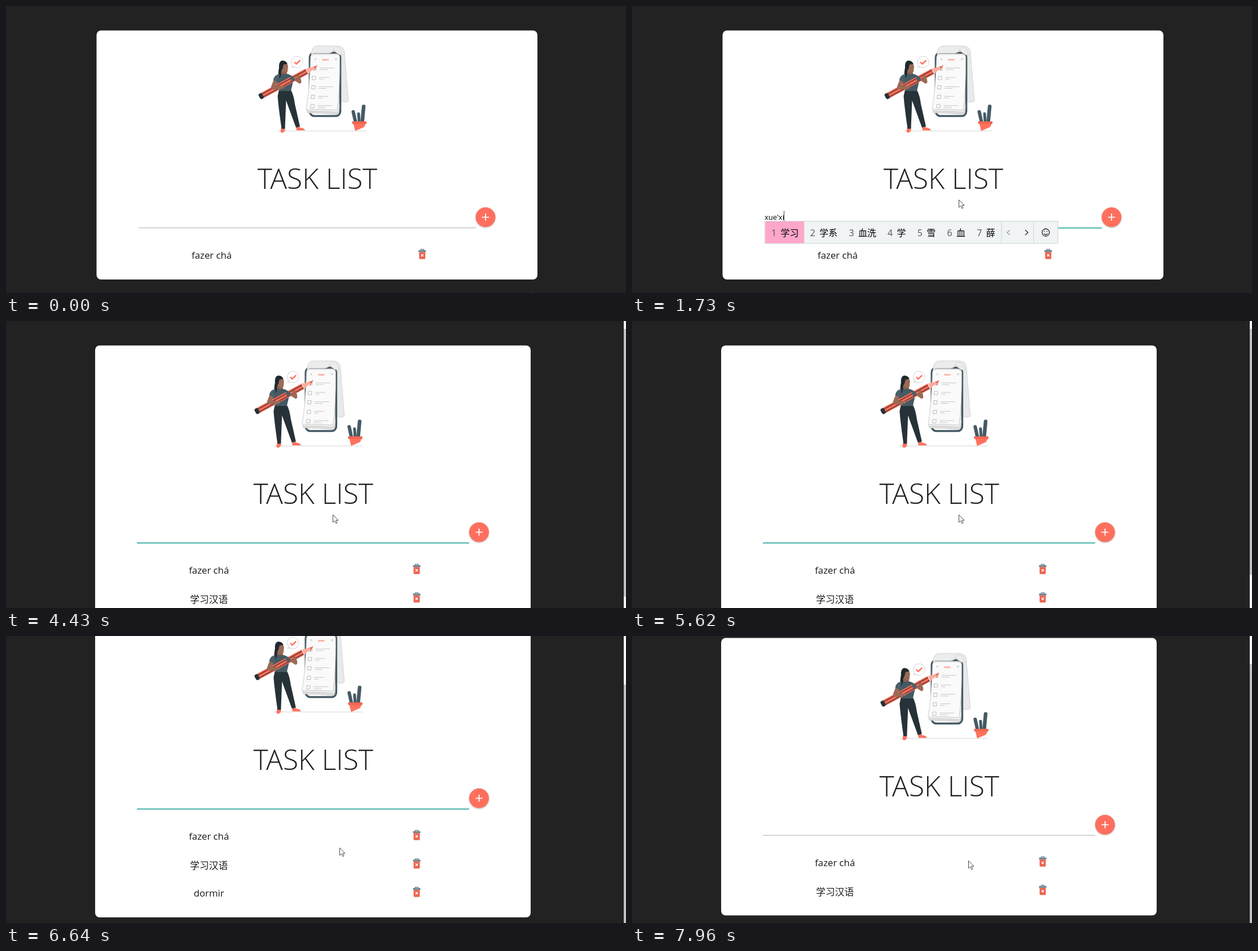
Recreate the animation shown at these times as an HTML page. Size 1099 by 510 pixels, loop 8000 ms.

```html
<!DOCTYPE html>
<html lang="pt">
<head>
<meta charset="utf-8">
<title>Task list</title>
<style>
  html, body { margin: 0; width: 100%; height: 100%; overflow: hidden; background: #222; }
  svg { display: block; width: 1099px; height: 510px; }
  text { font-family: "Open Sans", "Noto Sans CJK SC", "Noto Sans CJK", sans-serif; }
  #title { font-size: 49.7px; font-weight: 300; fill: #212121; }
  .task { font-size: 16.8px; fill: #1a1a1a; }
  .mid { text-anchor: middle; }
  #ime text { font-size: 16px; }
  #add { filter: drop-shadow(0 1.5px 1.5px rgba(0, 0, 0, .28)); }
</style>
</head>
<body>
<svg viewBox="0 0 1099 510" lang="zh-CN">
  <defs>
    <g id="bin">
      <path d="M-2.6 -7V-8.700H2.600V-7" fill="none" stroke="#607d8b" stroke-width="1.200"/>
      <rect x="-6.600" y="-7.300" width="13.200" height="3.600" rx="1" fill="#6f8792"/>
      <path d="M-5.500 -3.700H5.500V7Q5.500 8.800 4 8.800H-4Q-5.500 8.800 -5.500 7Z" fill="#ec654f"/>
      <path d="M-2 0L2 4M2 0L-2 4" stroke="#fff" stroke-width="1.400"/>
    </g>
  </defs>

  <g id="page">
    <rect id="card" y="43.5" rx="8" fill="#fff"/>

    <g id="art">
      <path d="M482 222H639" stroke="#d5d5d5" stroke-width="1.2"/>
      <!-- notepad -->
      <path d="M579 74Q597 70 600 84L607 169Q601 173 594 169L584 84Z" fill="#e9e9e9" stroke="#c8c8c8" stroke-width=".7"/>
      <rect x="538.5" y="83" width="54" height="112.500" rx="8" fill="#fff" stroke="#455a64" stroke-width="3.6"/>
      <path d="M541 88Q541 71 552 71H588Q600 72 600 84Q596 89 590 86Q583 82 581 78Q579 83 572 84H545Z" fill="#ececec" stroke="#c8c8c8" stroke-width=".8"/>
      <path d="M580 80Q580 73 588 73Q595 75 596 84" fill="none" stroke="#d0d0d0" stroke-width=".7"/>
      <path d="M536 178L534 190Q562 190 588 193Q591 190 591 178Z" fill="#dedede" stroke="#bdbdbd" stroke-width=".6"/>
      <path d="M535 174L533 187Q562 186 588 189Q591 185 591 174Z" fill="#eee" stroke="#bdbdbd" stroke-width=".6"/>
      <path d="M540 90Q541 86 546 86H587Q591 86 591.500 91Q592 150 587 185Q560 182 532 184Q538 150 540 90Z" fill="#fafafa" stroke="#c4c4c4" stroke-width=".8"/>
      <text class="mid" x="566" y="96.500" style="font-size:4px;font-weight:700" fill="#ff725e">TASKS</text>
      <path d="M547 93.500h3M547 95.500h3M583 93.500h4M583 95.500h4" stroke="#b5b5b5" stroke-width=".8"/>
      <g id="checks" fill="#fff" stroke="#b0b0b0" stroke-width=".9"></g>
      <path d="M545 110l2 3 4-8" fill="none" stroke="#ff725e" stroke-width="1.4"/>
      <!-- speech bubble -->
      <path d="M508 106L506 109L512 108.500" fill="#fff" stroke="#d0d0d0"/>
      <circle cx="516" cy="99.500" r="10.300" fill="#fff" stroke="#d3d3d3"/>
      <path d="M511 99.500L514.500 103L521.500 96.500" fill="none" stroke="#ff725e" stroke-width="2.400"/>
      <!-- plant -->
      <g stroke="#455a64" stroke-linecap="round">
        <path d="M619.500 206L615.500 188" stroke-width="6"/>
        <path d="M626 206L625 191.500" stroke-width="5"/>
        <path d="M631.500 206L634 178.500" stroke-width="6.500"/>
      </g>
      <path d="M615.500 208H638L635 215L619 222Z" fill="#ff725e"/>
      <rect x="613.500" y="205" width="25.500" height="4.500" rx="1" fill="#f2654f"/>
      <!-- figure -->
      <path d="M488 215L486.500 223Q488 226 491 225L494.500 222V215ZM514 214L515 221H530Q529 217 521 216L520 213Z" fill="#ff725e"/>
      <path d="M484 149H505Q510 158 512 174L521 214L514 216L496.500 168L494.500 218L488.500 218Q483 180 481.500 160Z" fill="#263238"/>
      <path d="M489 113L497 115L499 123H486Z" fill="#8d5f4d"/>
      <path d="M474 131Q476 122 486 121H500Q507 123 510 130L505 151H484L482 142Z" fill="#455a64"/>
      <path d="M489 101Q498 98 500 107L499 117Q495 120 490 116Z" fill="#9a6a56"/>
      <path d="M499 103Q496 96 489 97Q483 99 484 110Q482 118 483 130Q487 126 488 121Q487 116 490 112L492 104Z" fill="#20292e"/>
      <g transform="translate(450.500 161) rotate(-28.500)">
        <rect x="2" y="-5.300" width="92" height="10.600" fill="#ff725e"/>
        <path d="M2 -2.400H94M2 3H94" stroke="#8f4238" stroke-width="2.400"/>
        <path d="M94 -5.300L114 0L94 5.300Q97 3 94 1Q97 -2 94 -5.300Z" fill="#ffab9e"/>
        <path d="M109 -1.400L115 0L109 1.400Z" fill="#d5503e"/>
        <rect x="-1.500" y="-5.300" width="7" height="10.600" rx="3" fill="#263238"/>
      </g>
      <path d="M475 130L470 143Q469 150 477 148L492 147V142L478 142L482 134Z" fill="#9a6a56"/>
      <path d="M508 130L520 138Q525 138 523 131L520 123L515 124L517 131L508 126Z" fill="#9a6a56"/>
      <path d="M474 132Q475 122 485 121L483 136ZM502 122Q509 124 512 130L506 135Z" fill="#4a606a"/>
    </g>

    <text id="title" class="mid" y="324.500">TASK LIST</text>
    <rect id="line" y="393.600"/>
    <text id="input" y="380"></text>
    <rect id="caret" y="364" width="1" height="19" fill="#444"/>
    <g id="add">
      <circle cy="375.300" r="17.500" fill="#ff6f5e"/>
      <path d="M-6.200 375.300H6.200M0 369.100V381.500" stroke="#fff" stroke-width="1.800"/>
    </g>
    <g id="tasks"></g>
  </g>

  <g id="ime"></g>
  <g id="bar">
    <rect x="1095" width="4" height="510" fill="#f4f4f4"/>
    <rect id="thumb" x="1095" width="4" fill="#c1c1c1"/>
  </g>
  <path id="pointer" d="M.5 .5V13.800L3.600 11L5.800 15.800L8 14.800L5.900 10.200H10Z" fill="#fff" stroke="#333" stroke-width=".9"/>
</svg>
<script>
const $ = id => document.getElementById(id);
const LOOP = 8000;
const PITCH = 50.5;
const TASKS = ['fazer chá', '学习汉语', 'dormir'];

const WIDE = { left: 160.5, width: 781.5, mid: 551.2, line: 235, end: 833, add: 850, task: 364.6, bin: 737.8 };
const NARROW = { left: 158, width: 772, mid: 544, line: 232, end: 821, add: 838.5, task: 359.7, bin: 728 };

// Every track is a list of [time, value...]; a value holds until the next entry.
const count = [[0, 1], [3360, 2], [5390, 3], [7300, 2]];
const scroll = [[0, 0], [6390, 8], [6470, 33.6], [6560, 70], [6640, 87], [7300, 40]];
const caret = [[0, 0], [610, 1], [1170, 0], [1250, 1], [3360, 0], [3900, 1], [4430, 0],
  [4510, 1], [5620, 0], [6170, 1], [6640, 0]];
const typed = [[0, ''], [1250, 'x'], [1330, 'xu'], [1420, 'xue'], [1670, "xue'x"], [1730, "xue'xi"],
  [2040, "xue'xi'h"], [2120, "xue'xi'ha"], [2200, "xue'xi'han"], [2430, "xue'xi'han'y"],
  [2580, "xue'xi'han'yu"], [2810, '学习汉语'], [3360, ''], [4510, 'd'], [4580, 'do'],
  [4750, 'dorm'], [4900, 'dormi'], [5070, 'dormir'], [5390, '']];
const offers = [[0, ''], [1250, '下 小 想 新 学 些 西'], [1330, '需 许 续 徐 须 序 虚'],
  [1420, '学 雪 血 薛 靴 穴 削'], [1670, '学习 学校 学下 血型 学新 雪下 学些'],
  [1730, '学习 学系 血洗 学 雪 血 薛'], [2040, '学习会 学习和 学习后 学习好 学习还 学习很 学习'],
  [2200, '学习汉 学习和 学习喊 学习含 学习寒 学习汗 学习'],
  [2430, '学习汉语 学习 学系 血洗 学 雪 血'], [2810, '']];
const pointer = [[0, 931, 508], [70, 915, 496], [150, 850, 462], [230, 750, 424], [310, 650, 390],
  [380, 590, 372], [460, 566, 366], [690, 570, 361], [770, 577, 349], [860, 579, 344],
  [6090, 580, 348], [6170, 583, 357], [6240, 586, 366], [6320, 588, 373], [6640, 591, 376],
  [6720, 598, 382], [6790, 615, 394], [6870, 642, 411], [6960, 674, 430], [7030, 702, 444],
  [7100, 720, 451], [7170, 728, 455], [7810, 705, 445], [7890, 640, 418], [7960, 596, 399]];

const at = (track, t) => track.reduce((found, entry) => entry[0] <= t ? entry : found);
const clamp = v => Math.max(0, Math.min(1, v));
const isLatin = text => /^[a-z]/.test(text);
const set = (el, attrs) => { for (const k in attrs) el.setAttribute(k, attrs[k]); };

$('checks').innerHTML = [111, 128, 144.5, 161.5, 178].map((y, i) => {
  const x = 547 - i * .9;
  return `<path d="M${x - 3} ${y - 3}h6l-.5 6h-6z"/>
    <path d="M${x + 9} ${y - 1}h${i % 2 ? 18 : 26}M${x + 9} ${y + 2}h${i % 2 ? 8 : 14}" stroke-width=".7"/>`;
}).join('');

function drawTasks(n, box) {
  $('tasks').innerHTML = TASKS.slice(0, n).map((name, i) => {
    const y = i * PITCH, baseline = isLatin(name) ? 449 : 450;
    return `<text class="task mid" x="${box.task}" y="${baseline + y}">${name}</text>
      <use href="#bin" x="${box.bin}" y="${441 + y}"/>`;
  }).join('');
}

function drawIme(list) {
  if (!list) return '';
  let x = 236.5, words = '';
  const first = 36.7 + 16 * list.split(' ')[0].length;
  list.split(' ').forEach((word, i) => {
    words += `<text x="${x + 10.5}" y="408.500" fill="#555">${i + 1}</text><text x="${x + 27}" y="408.500">${word}</text>`;
    x += 36.7 + 16 * word.length;
  });
  x += 1.5;
  return `<rect x="235.500" y="382.500" width="${x + 100 - 235.5}" height="39.500" fill="#f0f4f4" stroke="#cdd1d1"/>
    <rect x="236.500" y="383" width="${first}" height="38.500" fill="#ffa6cb"/>${words}
    <path d="M${x} 383v39M${x + 57} 383v39" stroke="#cdd1d1"/>
    <g fill="none" stroke="#222" stroke-width="1.300">
      <path d="M${x + 15} 398l-5 4.500 5 4.500" stroke="#999"/>
      <path d="M${x + 42} 398l5 4.500-5 4.500"/>
      <circle cx="${x + 78.5}" cy="402.500" r="6.500"/>
      <path d="M${x + 75} 404.500q3.500 3.500 7 0M${x + 75.500} 400.500h1.500M${x + 80} 400.500h1.500"/>
    </g>`;
}

function place(n, box) {
  set($('card'), { x: box.left, width: box.width, height: 442.5 + (n - 1) * PITCH });
  set($('art'), { transform: `translate(${box.mid - WIDE.mid} 0)` });
  set($('title'), { x: box.mid + .7 });
  set($('input'), { x: box.line });
  set($('add'), { transform: `translate(${box.add} 0)` });
  drawTasks(n, box);
}

let shownCount, shownOffer;
function render(t) {
  const n = at(count, t)[1], box = n > 1 ? NARROW : WIDE;
  const top = at(scroll, t)[1], text = at(typed, t)[1], offer = at(offers, t)[1];
  const [, px, py] = at(pointer, t);

  if (n !== shownCount) place(shownCount = n, box);
  if (offer !== shownOffer) $('ime').innerHTML = drawIme(shownOffer = offer);

  set($('page'), { transform: `translate(0 ${-top})` });
  set($('pointer'), { transform: `translate(${px} ${py})` });

  const focus = clamp((t - 610) / 250) * (1 - clamp((t - 7230) / 300));
  const mix = (a, b) => Math.round(a + (b - a) * focus);
  set($('line'), {
    x: box.line, width: box.end - box.line, height: 1.2 + .5 * focus,
    fill: `rgb(${mix(184, 38)},${mix(184, 166)},${mix(184, 154)})`
  });

  const field = $('input');
  if (field.textContent !== text) {
    field.textContent = text;
    field.style.fontSize = isLatin(text) ? '13px' : '14px';
  }
  const width = text ? field.getComputedTextLength() : 0;
  set($('caret'), { x: Math.floor(box.line + width), opacity: at(caret, t)[1] });

  const three = n === 3;
  set($('bar'), { opacity: n > 1 ? 1 : 0 });
  set($('thumb'), { y: 14 + top * (three ? .83 : .9), height: three ? 437 : 476 });
}

const start = performance.now();
function tick() {
  render((performance.now() - start) % LOOP);
  requestAnimationFrame(tick);
}
tick();
</script>
</body>
</html>
```
